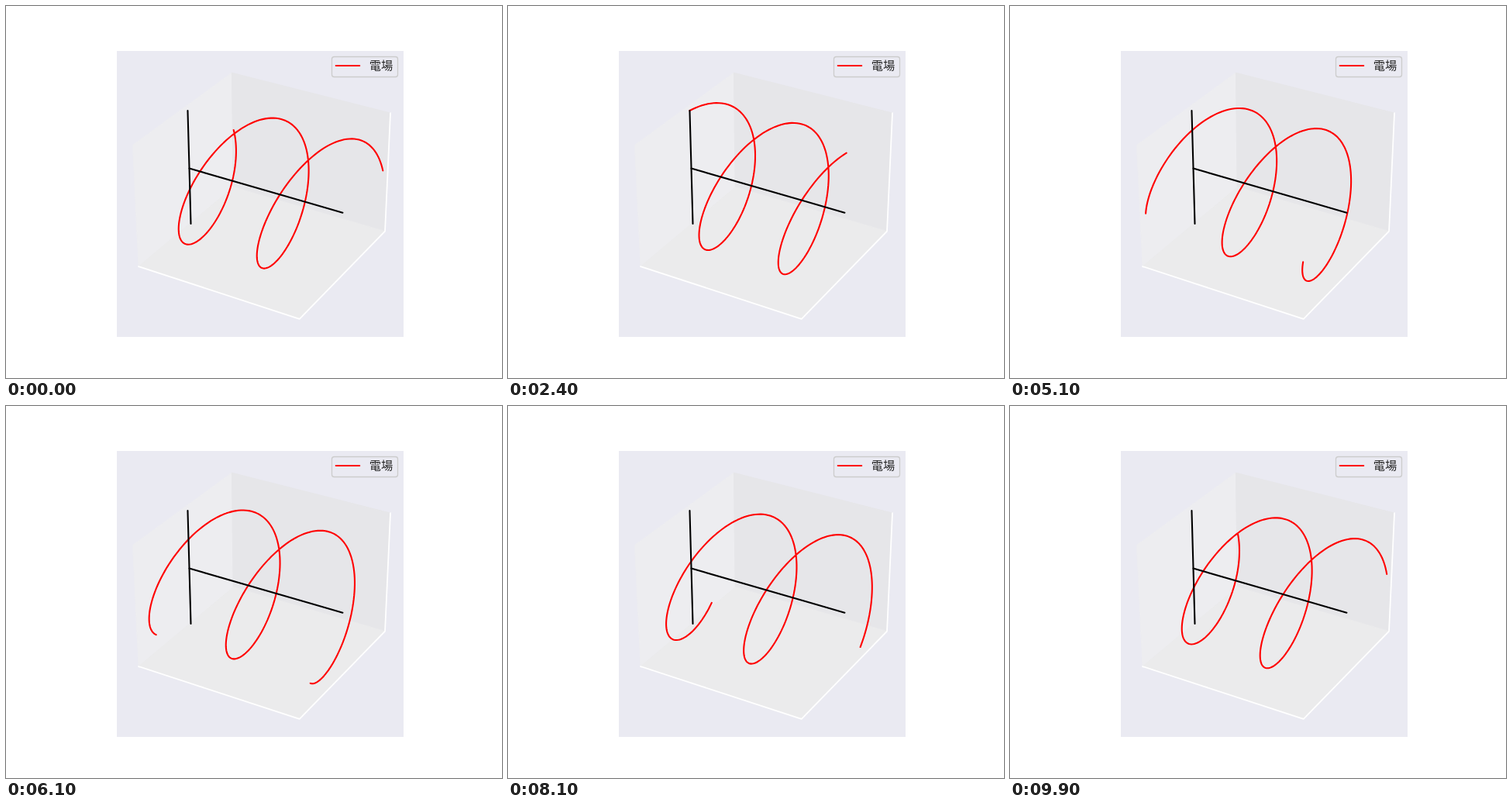
Write an HTML page that moves like this. It is 640 px wide and 480 px high and loops after 10 s.

```html
<!DOCTYPE html>
<html lang="ja">
<head>
<meta charset="utf-8">
<title>電場</title>
<style>
  html, body { margin: 0; width: 100%; height: 100%; overflow: hidden; background: #fff; }
  svg { display: block; }
  polyline { fill: none; stroke-linecap: round; stroke-linejoin: round; }
  .axis { stroke: #000; stroke-width: 2.08; }
  .wave { stroke: #f00; stroke-width: 2.08; }
  .edge { stroke: #fff; stroke-width: 1.74; }
  text { font: 15.28px "Noto Sans CJK JP", "Noto Sans CJK", sans-serif; fill: #262626; }
</style>
</head>
<body>
<svg width="640" height="480" viewBox="0 0 640 480">
  <rect x="143" y="58" width="370" height="369" fill="#eaeaf2"/>
  <g id="plot"></g>
  <rect x="420.5" y="65.5" width="85" height="26" rx="3" fill="#eaeaf2" stroke="#ccc" stroke-width="1.3"/>
  <polyline class="wave" points="425.7,77 456.2,77"/>
  <text x="468.8" y="82.2">電場</text>
</svg>
<script>
const plot = document.getElementById('plot');
const FRAME = 100, FRAMES = 100, TURNS = 2, SAMPLES = 240, TAU = 2 * Math.PI;
const PANE = 25 / 24; // panes reach slightly past the data limits

// Perspective view, elevation 30°, azimuth -60°; data coordinates run from -1 to 1.
const C = Math.sqrt(3) / 2, DIST = 10, SCALE = 369.6 / 0.185;
function project([a, b, c]) {
  const x = a * 4 / 7, y = b * 4 / 7, z = c * 3 / 7;
  const right = C * x + y / 2;
  const up = -x / 4 + C / 2 * y + C * z;
  const depth = DIST - (C / 2 * x - 0.75 * y + z / 2);
  return [333 + SCALE * right / depth, 237.4 - SCALE * up / depth]
    .map(v => v.toFixed(2)).join();
}
const toPoints = list => list.map(project).join(' ');

function add(tag, attrs, list = []) {
  const el = document.createElementNS('http://www.w3.org/2000/svg', tag);
  for (const key in attrs) el.setAttribute(key, attrs[key]);
  el.setAttribute('points', toPoints(list));
  return plot.appendChild(el);
}
const corners = list => list.map(p => p.map(v => v * PANE));
const pane = (color, list) =>
  add('polygon', { fill: color, stroke: color, 'stroke-width': 1 }, corners(list));

pane('#ededf0', [[-1, -1, -1], [-1, 1, -1], [-1, 1, 1], [-1, -1, 1]]);
pane('#e6e6e9', [[-1, 1, -1], [1, 1, -1], [1, 1, 1], [-1, 1, 1]]);
pane('#ebebec', [[-1, -1, -1], [1, -1, -1], [1, 1, -1], [-1, 1, -1]]);
add('polyline', { class: 'edge' }, corners([[-1, -1, -1], [1, -1, -1], [1, 1, -1], [1, 1, 1]]));

const wave = add('polyline', { class: 'wave' });
add('polyline', { class: 'axis' }, [[-1, 0, 0], [1, 0, 0]]);
add('polyline', { class: 'axis' }, [[-1, 0, -1], [-1, 0, 1]]);

// Circularly polarised field travelling along x.
function helix(phase) {
  return Array.from({ length: SAMPLES + 1 }, (_, i) => {
    const s = i / SAMPLES, angle = TAU * (phase - TURNS * s);
    return [2 * s - 1, Math.cos(angle), Math.sin(angle)];
  });
}

function draw() {
  const step = Math.floor(performance.now() / FRAME) % FRAMES;
  wave.setAttribute('points', toPoints(helix((step + 1) / FRAMES)));
  requestAnimationFrame(draw);
}
draw();
</script>
</body>
</html>
```
